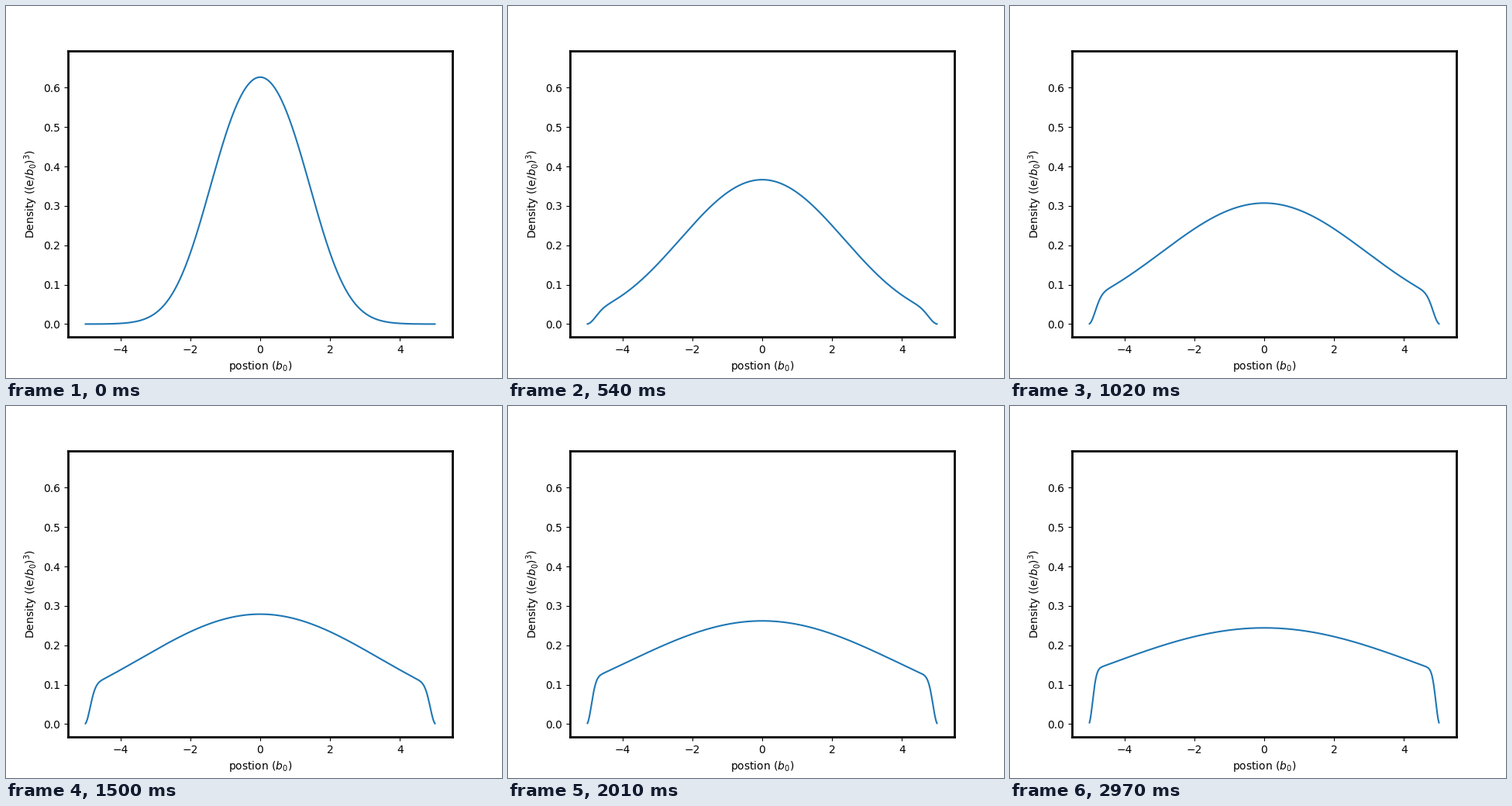
Animation of 640 by 480 pixels, one loop 3000 ms. Source, as a matplotlib script:

```python
import numpy as np
import matplotlib.pyplot as plt
from matplotlib.animation import FuncAnimation

# Two electrons in a boxed harmonic trap, heated step by step (atomic units).
N_GRID = 400
N_ELECTRONS = 2
FRAMES = 100
T_START, T_STEP = 1.16, 0.1905

x = np.linspace(-5, 5, N_GRID)
dx = x[1] - x[0]


def solve_trap():
    """Energies and normalised orbital densities on the grid."""
    hop = np.full(N_GRID - 1, -0.5 / dx**2)
    h = np.diag(1 / dx**2 + 0.5 * x**2) + np.diag(hop, 1) + np.diag(hop, -1)
    energy, psi = np.linalg.eigh(h)
    return energy, psi**2 / dx


energy, orbitals = solve_trap()


def occupation(mu, temp):
    """Fermi-Dirac filling with two spins per level."""
    return 1 - np.tanh((energy - mu) / (2 * temp))


def density(temp):
    low, high = -60 * temp, 60 * temp
    for _ in range(60):
        mu = (low + high) / 2
        if occupation(mu, temp).sum() > N_ELECTRONS:
            high = mu
        else:
            low = mu
    return orbitals @ occupation(mu, temp)


fig, ax = plt.subplots(figsize=(6.4, 4.8), dpi=100)
line, = ax.plot(x, density(T_START), color="#1f77b4", lw=1.5)
ax.set_xlim(-5.5, 5.5)
ax.set_ylim(-0.03305, 0.69405)
ax.set_xlabel("postion ($b_0$)")
ax.set_ylabel("Density ((e/$b_0)^3$)")
for spine in ax.spines.values():
    spine.set_linewidth(2)


def update(i):
    line.set_ydata(density(T_START + T_STEP * i))
    return line,


anim = FuncAnimation(fig, update, frames=FRAMES, interval=30,
                     repeat=True, repeat_delay=0)
plt.show()
```
